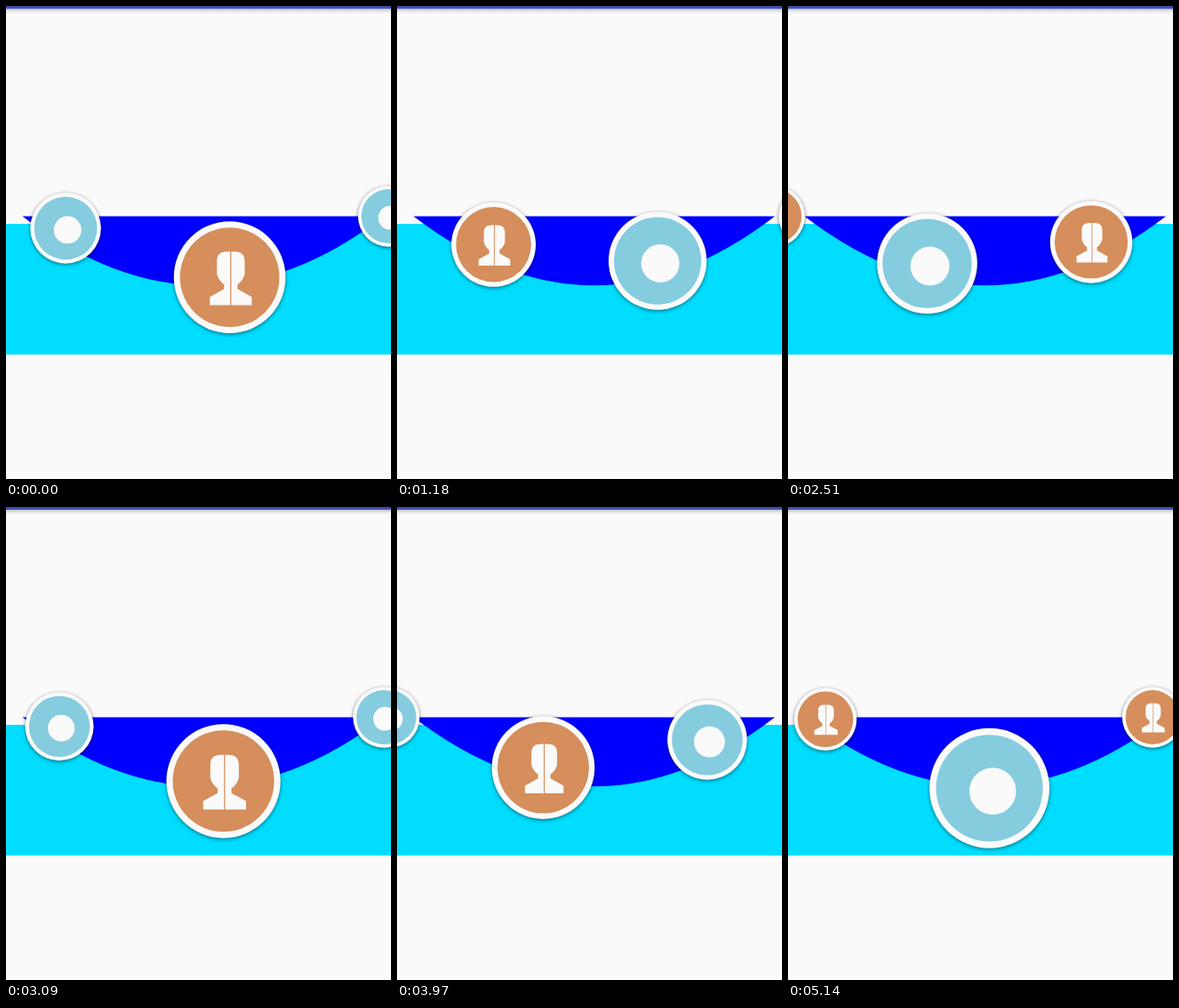
An HTML page with a canvas for the animation above (5240 ms loop, 433 by 532 pixels).

```html
<!DOCTYPE html>
<html lang="en">
<head>
<meta charset="utf-8">
<title>Arc carousel</title>
<style>
  html, body { margin: 0; width: 100%; height: 100%; overflow: hidden; background: #fafafa; }
  canvas { display: block; width: 433px; height: 532px; }
</style>
</head>
<body>
<canvas id="stage" width="433" height="532"></canvas>
<script>
const ctx = document.getElementById('stage').getContext('2d');
const W = 433, H = 532;
const LOOP = 5240, STEP = 146.85, TICK = 147.2;
const SWIPES = [-693, 788, 2311, 3809];   // start time of each swipe
const SWIPE_MS = 2150;
const MID = 221.5, GAP = 184.5, OUTER_GAP = 148;
const LOW = 236.5, DROP = 82, RADIUS = 34.2;
const PAPER = '#fafafa';

const clamp = v => Math.min(1, Math.max(0, v));
const easeOut = v => 1 - Math.pow(1 - clamp(v), 5);

function scrollAt(t) {
  return SWIPES.reduce((u, start) => u - easeOut((t - start) / SWIPE_MS), 1.02);
}

function disc(x, y, r, color) {
  ctx.fillStyle = color;
  ctx.beginPath();
  ctx.arc(x, y, r, 0, Math.PI * 2);
  ctx.fill();
}

function rect(y, h, color) {
  ctx.fillStyle = color;
  ctx.fillRect(0, y, W, h);
}

function backdrop() {
  rect(0, H, PAPER);
  const shade = ctx.createLinearGradient(0, 3, 0, 9);
  shade.addColorStop(0, 'rgba(0,0,0,.28)');
  shade.addColorStop(0.4, 'rgba(0,0,0,.09)');
  shade.addColorStop(1, 'rgba(0,0,0,0)');
  rect(3, 6, shade);
  rect(0, 3, '#3f51b5');
  rect(245, 147, '#00ddff');
  ctx.fillStyle = '#0000ff';
  ctx.beginPath();
  ctx.moveTo(18.5, 236.5);
  ctx.quadraticCurveTo(222, 392, 425, 236.5);
  ctx.fill();
}

// Head and shoulders, in units of the badge radius
function person(x, y, r) {
  ctx.save();
  ctx.translate(x + 0.02 * r, y);
  ctx.scale(r, r);
  ctx.fillStyle = PAPER;
  ctx.beginPath();
  for (const side of [-1, 1]) {
    ctx.moveTo(0, -0.46);
    ctx.lineTo(side * 0.06, -0.46);
    ctx.bezierCurveTo(side * 0.2, -0.46, side * 0.25, -0.4, side * 0.25, -0.27);
    ctx.lineTo(side * 0.25, -0.06);
    ctx.quadraticCurveTo(side * 0.22, 0.06, side * 0.12, 0.13);
    ctx.lineTo(side * 0.12, 0.21);
    ctx.lineTo(side * 0.375, 0.35);
    ctx.lineTo(side * 0.375, 0.5);
    ctx.lineTo(-side * 0.01, 0.5);
    ctx.lineTo(-side * 0.01, -0.46);
    ctx.closePath();
  }
  ctx.fill('nonzero');
  ctx.restore();
}

function badge(u, isPerson) {
  const d = Math.abs(u);
  const near = Math.min(d, 1);
  const x = MID + Math.sign(u) * (near * GAP + (d - near) * OUTER_GAP);
  const y = LOW + DROP * (1 - near);
  const r = RADIUS * (2 - near);
  ctx.save();
  ctx.shadowColor = 'rgba(0,0,0,.5)';
  ctx.shadowBlur = 4;
  ctx.shadowOffsetY = 1.2;
  disc(x, y, r, PAPER);
  ctx.restore();
  disc(x, y, r * 0.89, isPerson ? '#d58e5c' : '#85ccde');
  if (isPerson) person(x, y, r);
  else disc(x + 0.055 * r, y + 0.05 * r, r * 0.39, PAPER);
}

function draw(t) {
  backdrop();
  const scroll = scrollAt(t);
  for (let i = -2; i < 7; i++) {
    const u = i + scroll;
    if (Math.abs(u) < 2) badge(u, i % 2 === 0);
  }
}

const begin = performance.now();
function loop() {
  const t = (performance.now() - begin) % LOOP;
  draw(Math.floor(t / STEP) * TICK);
  requestAnimationFrame(loop);
}
loop();
</script>
</body>
</html>
```
